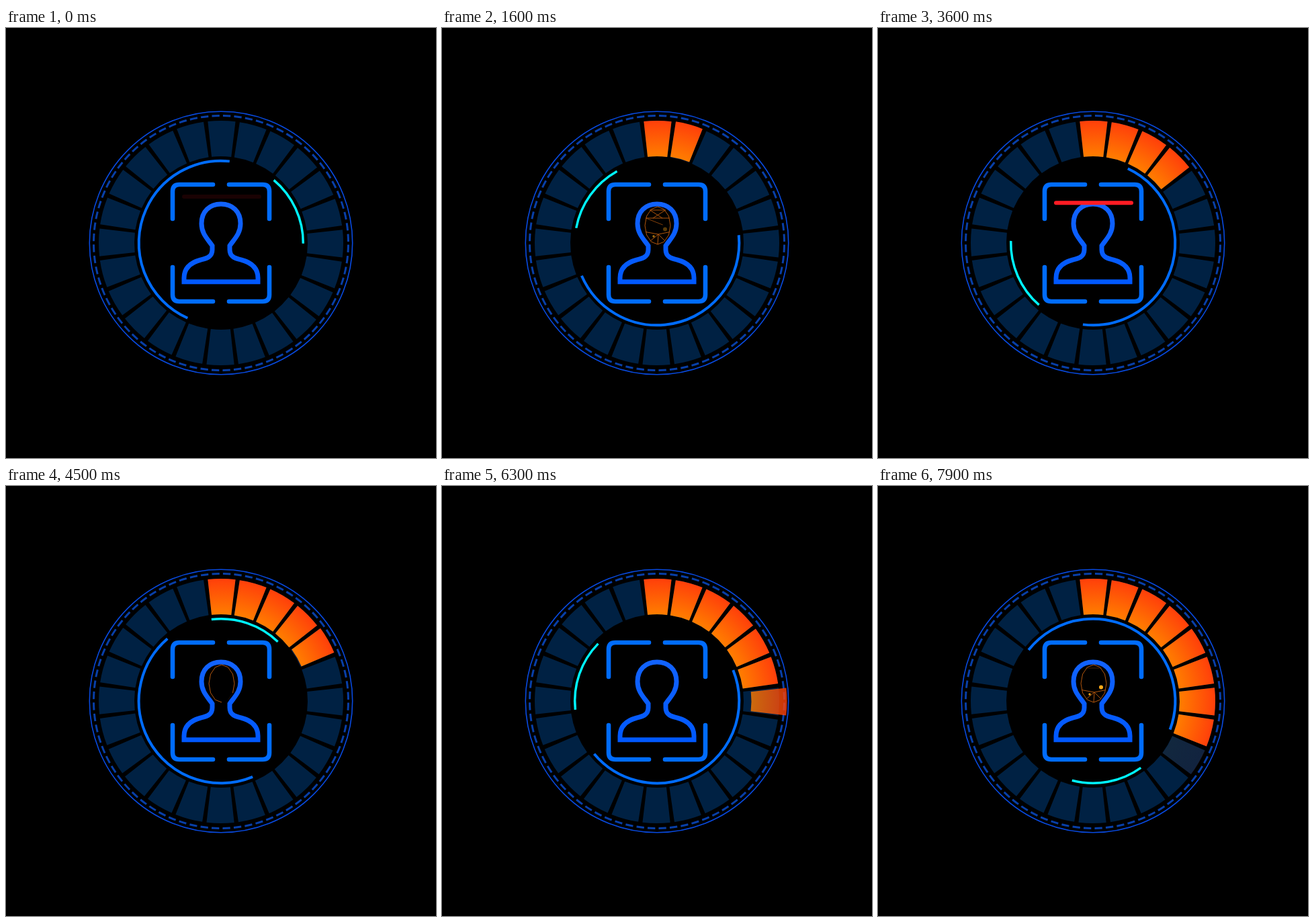
An HTML page with a canvas that plays this animation: 640x640 px, repeating every 8000 ms.

```html
<!DOCTYPE html>
<html>
<head>
<meta charset="utf-8">
<style>
html, body { margin: 0; width: 100%; height: 100%; overflow: hidden; background: #000; }
canvas { display: block; width: 640px; height: 640px; }
</style>
</head>
<body>
<canvas id="stage" width="640" height="640"></canvas>
<script>
const ctx = document.getElementById('stage').getContext('2d');
const LOOP = 8000, SCAN = 3200, C = 320, TAU = 2 * Math.PI, RAD = Math.PI / 180;
const BLUE = '#006cff';
const SEGMENTS = 24, LIT_EVERY = 970, LIT_START = 110;
const INNER = 129, OUTER = 182;

const clamp = v => Math.min(1, Math.max(0, v));
// Smooth rise and fall between times a and b
const bump = (t, a, b) => Math.sin(Math.PI * clamp((t - a) / (b - a))) ** 2;

const hot = ctx.createRadialGradient(C, C, INNER, C, C, OUTER);
hot.addColorStop(0, '#ff7d00');
hot.addColorStop(1, '#ff3f0a');

const skin = ctx.createLinearGradient(0, 260, 0, 380);
skin.addColorStop(0, '#1263ff');
skin.addColorStop(1, '#0058ff');

function mirrored(d) {
  const half = new Path2D(d), path = new Path2D(d);
  path.addPath(half, new DOMMatrix([-1, 0, 0, 1, 2 * C, 0]));
  return path;
}

const headHalf = 'M320 262 C337 262 349 273 349 291 C349 306 340 314 333 324 V330';
const head = mirrored(headHalf);
const person = mirrored(headHalf + ' C333 341 342 343 350 345 C365 349 375 357 375 372 V377.7 H320');
const corner = new Path2D('M248 284 V243 Q248 233 258 233 H308');

// Wireframe face: outline, chin fan, then rows with zigzags between them
function faceLines() {
  const cx = 321, cy = 294, lines = [];
  const halfWidth = y => 19 * Math.sqrt(1 - ((y - cy) / 29) ** 2);
  const rim = a => [cx + 19 * Math.cos(a), cy + 28 * Math.sin(a)];
  for (let i = 0; i < 12; i++) lines.push([...rim((i + 3) * TAU / 12), ...rim((i + 4) * TAU / 12)]);
  for (let i = 0; i < 5; i++) lines.push([322, 307, ...rim((20 + i * 35) * RAD)]);
  const rows = [271, 283, 293, 303];
  rows.forEach((y, i) => {
    const w = halfWidth(y), next = rows[i + 1];
    lines.push([cx - w, y, cx + w, y]);
    if (!next) return;
    const v = halfWidth(next);
    lines.push([cx - w, y, cx + v * .4, next], [cx + w, y, cx - v * .4, next]);
    if (i) lines.push([cx, y, cx + v, next]);
  });
  return lines;
}
const face = faceLines();

function arc(r, from, to, width, color) {
  ctx.beginPath();
  ctx.arc(C, C, r, from * RAD, to * RAD);
  ctx.lineWidth = width;
  ctx.strokeStyle = color;
  ctx.stroke();
}

function line(x1, y1, x2, y2) {
  ctx.beginPath();
  ctx.moveTo(x1, y1);
  ctx.lineTo(x2, y2);
  ctx.stroke();
}

function segment(i, fill, push) {
  const mid = (i * 360 / SEGMENTS - 89.7) * RAD, half = 6.5 * RAD;
  ctx.save();
  ctx.translate(Math.cos(mid) * push, Math.sin(mid) * push);
  ctx.beginPath();
  ctx.arc(C, C, OUTER, mid - half, mid + half);
  ctx.arc(C, C, INNER, mid + half, mid - half, true);
  ctx.closePath();
  ctx.fillStyle = fill;
  ctx.fill();
  ctx.restore();
}

// Lit segments drift outward while fading in, then snap back
function litPush(u) {
  const peak = 360;
  return 11.5 * (u < peak ? Math.sin(u / peak * Math.PI / 2) : Math.exp((peak - u) / 60));
}

function drawRing(t) {
  arc(195.7, 0, 360, 1.6, '#084ae0');
  const step = TAU * 189.5 / 72, gap = 5.2;
  ctx.setLineDash([step - gap, gap]);
  ctx.lineDashOffset = -gap / 2;
  arc(189.5, 0, 360, 3, '#083fa8');
  ctx.setLineDash([]);
  for (let i = 0; i < SEGMENTS; i++) segment(i, '#002143', 0);
  for (let i = 0; i < SEGMENTS; i++) {
    const u = t - LIT_START - i * LIT_EVERY;
    if (u < 0) break;
    ctx.globalAlpha = .07 + .93 * clamp(u / 380) ** 3;
    segment(i, hot, litPush(u));
  }
  ctx.globalAlpha = 1;
}

function drawArcs(t) {
  const a = t * .1503;
  arc(122.3, 114 + a, 276 + a, 4, BLUE);
  arc(122.3, -50 + a, .4 + a, 3.5, '#00f4ff');
}

function drawFrame() {
  ctx.lineWidth = 6.6;
  ctx.lineCap = 'round';
  ctx.strokeStyle = BLUE;
  for (const sx of [1, -1]) for (const sy of [1, -1]) {
    ctx.save();
    ctx.translate(C, C);
    ctx.scale(sx, sy);
    ctx.translate(-C, -C);
    ctx.stroke(corner);
    ctx.restore();
  }
  ctx.lineCap = 'butt';
}

function tintHead(alpha, edge) {
  if (alpha <= 0) return;
  ctx.save();
  ctx.beginPath();
  ctx.rect(240, 240, 160, edge - 240);
  ctx.clip();
  ctx.globalAlpha = alpha;
  ctx.strokeStyle = '#ffcc0a';
  ctx.stroke(head);
  ctx.restore();
}

function drawPerson(p, scanY) {
  ctx.lineWidth = 7;
  ctx.strokeStyle = skin;
  ctx.stroke(person);
  tintHead(clamp((p - 600) / 300) * clamp((1300 - p) / 150), scanY + 2);
  tintHead(.45 * bump(p, 1700, 2400), 300);
}

function drawFace(p) {
  const shown = clamp((p - 1000) / 800) * face.length;
  const fade = clamp((2900 - p) / 500);
  ctx.lineWidth = 1;
  ctx.strokeStyle = '#b0560e';
  face.forEach((l, i) => {
    ctx.globalAlpha = clamp(shown - i) * fade;
    if (ctx.globalAlpha > 0) line(...l);
  });
  // Glints: x, y, radius, time of peak
  for (const [x, y, r, at] of [[332, 299.5, 3, 1480], [315, 310, 1.7, 1520], [332, 300, 2.5, 2100], [325.5, 281, 2, 2320]]) {
    ctx.globalAlpha = bump(p, at - 200, at + 200);
    ctx.fillStyle = '#ffac1a';
    ctx.beginPath();
    ctx.arc(x, y, r, 0, TAU);
    ctx.fill();
  }
  ctx.globalAlpha = 1;
}

function drawScan(p, y) {
  ctx.globalAlpha = clamp((p + 20) / 200) * clamp((1200 - p) / 150);
  ctx.lineWidth = 6;
  ctx.lineCap = 'round';
  ctx.strokeStyle = '#ff1c24';
  line(265, y, 377, y);
  ctx.lineCap = 'butt';
  ctx.globalAlpha = 1;
}

// The picture holds for 100 ms and the motion underneath runs at 25 steps a second
function stepped(ms) {
  const t = Math.floor((ms % LOOP + .5) / 100) * 100 % LOOP;
  return t - t % 40;
}

const start = performance.now();
function render(now) {
  const t = stepped(Math.max(0, now - start)), p = t % SCAN;
  const scanY = 251 + 75.5 * bump(p, 300, 1180);
  ctx.fillStyle = '#000';
  ctx.fillRect(0, 0, 640, 640);
  drawRing(t);
  drawArcs(t);
  drawFrame();
  drawPerson(p, scanY);
  drawFace(p);
  drawScan(p, scanY);
  requestAnimationFrame(render);
}
render(start);
</script>
</body>
</html>
```
